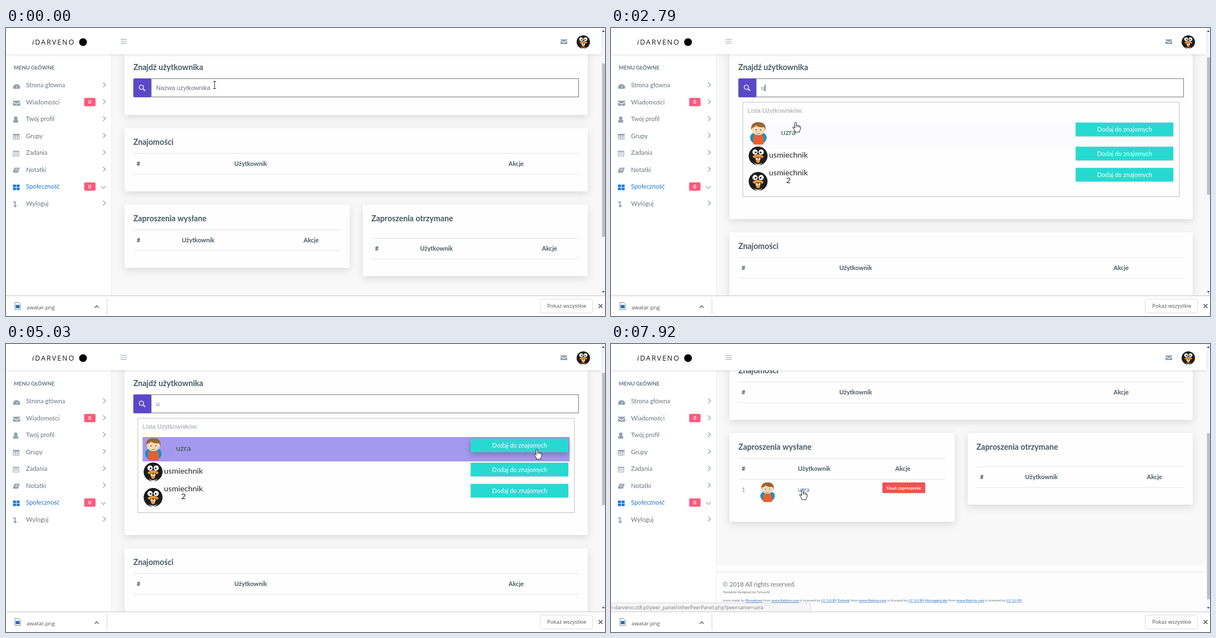
Write an HTML page that moves like this. It is 1077 px wide and 520 px high and loops after 8000 ms.

```html
<!DOCTYPE html>
<html lang="pl">
<head>
<meta charset="utf-8">
<style>
  html, body { margin: 0; width: 100%; height: 100%; overflow: hidden; background: #fff; }
  svg { display: block; }
  text { font: 11.1px Lato, sans-serif; fill: #67757f; white-space: pre; }
  .bold { font-weight: 700; fill: #455a64; }
  .title { font-size: 14.2px; }
  .name { font-size: 14.2px; fill: #222; text-anchor: middle; }
  .white { fill: #fff; text-anchor: middle; }
  .field { font-family: "Liberation Sans", Arial, sans-serif; }
  .shell { font: 9.5px "Open Sans", sans-serif; fill: #4c4f54; }
  .tiny { font-size: 6.3px; }
  .link { fill: #1f6fc0; text-decoration: underline; }
  .card { fill: #fefefe; filter: drop-shadow(0 4px 7px rgba(0,0,0,.12)); }
  .button { filter: drop-shadow(0 1px 1px rgba(0,0,0,.15)); }
  .line { stroke: #e0e3e5; fill: none; }
  .icon { fill: #8fa2ad; }
  .stroke { fill: none; stroke: #8fa2ad; stroke-width: 1.2; }
</style>
</head>
<body>
<svg id="stage" width="1077" height="520" viewBox="0 0 1077 520"></svg>
<script>
const text = (x, y, s, cls = '', extra = '') => `<text x="${x}" y="${y}" class="${cls}" ${extra}>${s}</text>`;
const rect = (x, y, w, h, fill, extra = '') => `<rect x="${x}" y="${y}" width="${w}" height="${h}" fill="${fill}" ${extra}/>`;
const path = (d, extra = '') => `<path d="${d}" ${extra}/>`;
const group = (id, body) => `<g id="${id}">${body}</g>`;
const place = (x, y, scale, body) => `<g transform="translate(${x} ${y}) scale(${scale})">${body}</g>`;
const card = (x, y, w, h, id = '') => rect(x, y, w, h, '', `rx="3" class="card" id="${id}"`);
const link = s => `<tspan class="link">${s}</tspan>`;

const penguin = (x, y, r) => place(x, y, r / 17, `
  <circle r="17" fill="#1d1d1f"/>
  <circle cx="-5.5" cy="-7" r="4.7" fill="#fff"/><circle cx="5.5" cy="-7" r="4.7" fill="#fff"/>
  <circle cx="-4.5" cy="-6.5" r="1.6"/><circle cx="4.5" cy="-6.5" r="1.6"/>
  <path d="M-10 1Q0-7 10 1Q8 5 4 4L3 11Q0 14-3 11L-5 4Q-9 4-10 1" fill="#f09a32"/>
  <path d="M-5 2H6L5 5H-4Z" fill="#5a2a18"/>
  <path d="M-4 3h3v4h-3zM1 3h3v4h-3z" fill="#fff"/>
  <path d="M-8 12Q0 18 8 12Q4 17 0 17T-8 12" fill="#eee"/>`);

const boy = (x, y, scale) => place(x, y, scale, `
  <path d="M-15 8Q-14-1-5-1H5Q14-1 15 8Q13 20 0 20T-15 8" fill="#1d8fc1"/>
  <path d="M-9 20Q-11 7-6 2L0 6L6 2Q11 7 9 20Q0 21-9 20" fill="#ec5f2c"/>
  <ellipse cy="-7" rx="12" ry="10.5" fill="#fad5ae"/>
  <path d="M-13-6Q-14-19-2-20Q14-21 13-6L10-11Q0-10-4-14Q-8-10-11-10Z" fill="#97652f"/>
  <circle cx="-5" cy="-6" r="2.2" fill="#fff"/><circle cx="5" cy="-6" r="2.2" fill="#fff"/>
  <circle cx="-4.5" cy="-6" r="1.2" fill="#333"/><circle cx="4.5" cy="-6" r="1.2" fill="#333"/>
  <path d="M-3 0Q0 2 3 0" stroke="#b5654a" fill="none"/>`);

const envelope = (x, y) => place(x, y, 1, path('M0 1H12V2.5L6 6L0 2.5ZM0 4L6 7.5L12 4V9.5H0Z', 'class="icon"'));

const addButton = (x, y, id = '') =>
  rect(x, y, 175.5, 24.7, '#26dad2', `class="button" id="${id}"`) + text(x + 88, y + 16.3, 'Dodaj do znajomych', 'white');

// Table header: columns are the x positions of its three labels.
const tableHead = (x1, x2, y, cols) =>
  path(`M${x1} ${y}H${x2}M${x1} ${y + 37.5}H${x2}`, 'class="line"') +
  ['#', 'Użytkownik', 'Akcje'].map((s, i) => text(cols[i], y + 22.7, s, 'bold')).join('');

const person = ['uzra', 'usmiechnik', '2'];

const listPlain = group('listPlain',
  text(286, 183.5, person[0], 'name') + text(286, 204, person[1], 'name') +
  text(286, 224.5, person[1], 'name') + text(286, 239.8, person[2], 'name') +
  addButton(835.5, 170.8) + addButton(660, 191.3) + addButton(484, 211.8));

const listRich = group('listRich',
  rect(245.5, 168, 768, 44, '#a598ef', 'id="row1"') + rect(245.5, 212, 768, 38, '#a598ef', 'id="row2"') +
  boy(265, 190, 1) + penguin(264.5, 231, 17) + penguin(264.5, 277, 17) +
  text(319, 193, person[0], 'name', 'id="name1"') + text(319, 233.7, person[1], 'name') +
  text(319, 265.5, person[1], 'name') + text(319, 280, person[2], 'name') +
  addButton(835.5, 170.8, 'add1') + addButton(835.5, 214.3) + addButton(835.5, 252.5));

const search =
  card(213, 20, 833, 137, 'searchCard') + text(229, 76, 'Znajdź użytkownika', 'bold title') +
  rect(261, 91.5, 768.5, 33, '#fff', 'stroke="#777"') + rect(229, 91, 32, 34, '#5a48c8', 'rx="2" class="button"') +
  path('M247 110.5l3 3', 'stroke="#fff" stroke-width="1.8"') +
  '<circle cx="243.5" cy="107" r="3.9" fill="none" stroke="#fff" stroke-width="1.4"/>' +
  text(270, 112, 'Nazwa użytkownika', 'field', 'id="hint"') + text(270, 112, 'u', 'field', 'id="typed"') +
  rect(270, 102, 1, 12.5, '#222', 'id="caret"') +
  group('list', rect(237, 134, 785, 120, '#fefefe', 'stroke="#bcbfc1" id="listBox"') +
    text(245.5, 153, 'Lista Użytkowników:', 'field', 'style="fill:#99a3a6"') + listPlain + listRich);

const sentRow = group('sentRow', tableHead(229, 601, 364.5, [235, 336, 511]) +
  text(235, 425, '1', '', 'style="fill:#8f8ba8"') + boy(281.5, 425.5, .88) +
  text(336, 425, person[0], '', 'style="fill:#4a6cb8"') +
  rect(488, 408, 77, 19, '#ef5350', 'rx="2" class="button"') +
  text(526.5, 420.5, 'Usuń zaproszenie', 'white bold', 'style="font-size:8px;fill:#fff"'));

const source = link('www.flaticon.com') + ' is licensed by ' + link('CC 3.0 BY');
const credits = ['Brevaikons', 'Dolnuik', 'MorvagenLabs'].map(s => `${link(s)} from ${source}`).join(' ');
const footer = group('footer', rect(189, 558, 882, 120, '#fdfdfd') + path('M189 569.5H1071', 'class="line"') +
  text(201, 595.5, '© 2018 All rights reserved.') + text(201, 608, 'Template designed by Tynvarib', 'tiny') +
  text(201, 623, 'Icons made by ' + credits, 'tiny'));

const below = group('below',
  card(213, 181, 833, 114) + text(229, 211, 'Znajomości', 'bold title') + tableHead(229, 1030, 226.5, [235, 410.5, 903.5]) +
  card(213, 319, 405, 114, 'sentCard') + text(229, 349, 'Zaproszenia wysłane', 'bold title') +
  group('sentEmpty', tableHead(229, 601, 364.5, [235, 316, 535])) + sentRow +
  card(641.5, 319, 404.5, 129) + text(657, 349, 'Zaproszenia otrzymane', 'bold title') +
  tableHead(657, 1030, 379.5, [663.5, 744.5, 963.5]) + footer);

const menu = [
  ['Strona główna', 'M0 9A6.5 6.5 0 0 1 13 9L12 11H1ZM6 9L8 4L7.5 9Z'],
  ['Wiadomości', 'M0 2H13V3.5L6.5 7.5L0 3.5ZM0 5L6.5 9L13 5V11H0Z'],
  ['Twój profil', 'M5 0A3 3 0 0 1 5 6.5A3 3 0 0 1 5 0M.5 11Q0 6 3 6Q5 7.5 7 6Q10 6 9.5 11Z'],
  ['Grupy', 'M0 1H12V11H0ZM1 4V6H4V4ZM5 4V6H8V4ZM9 4V6H11.5V4ZM1 7V10H4V7ZM5 7V10H8V7ZM9 7V10H11.5V7Z'],
  ['Zadania', 'M0 1H11V11H0ZM1 3V10H10V3ZM2 4.5H9V5.5H2ZM2 7H9V8H2Z'],
  ['Notatki', 'M3 1H12L9 10H1Q0 10 0 8ZM4.5 3L4 4H9L9.5 3ZM4 5.5L3.5 6.5H8L8.5 5.5Z'],
  ['Społeczność', 'M0 1H5.5V5.5H0ZM6.5 1H12V5.5H6.5ZM0 6.5H5.5V11H0ZM6.5 6.5H12V11H6.5Z'],
  ['Wyloguj', 'M0 1H5V8H7.5L4 12L.5 8H3V3H1Z']
].map(([label, icon], i) => {
  const y = 107.3 + 30.5 * i, active = i == 6, color = active ? '#1976d2' : '#8fa2ad';
  const badge = i == 1 || active
    ? rect(140.5, y + 19 - 30.5, 20.5, 15, '#fb5b7c', 'rx="2"') +
      text(150.7, y - .5, '0', 'white bold', 'style="fill:#fff;font-size:9px"') : '';
  const chevron = active ? `M171 ${y - 5}l4.2 4.5l4.2-4.5` : `M174.5 ${y - 9}l4.5 4.2l-4.5 4.2`;
  return place(12.5, y - 8.5, 1, path(icon, `fill="${color}" fill-rule="evenodd"`)) +
    text(36, y, label, '', active ? 'style="fill:#1976d2"' : '') + badge + path(chevron, 'class="stroke"');
}).join('');

const sidebar = rect(0, 48, 189, 436, '#fff') + path('M189.5 48V484', 'stroke="#eee"') +
  text(14, 74.5, 'MENU GŁÓWNE', 'bold', 'style="font-size:9.5px;fill:#607585"') + menu;

const scrollbar = rect(1070.5, 0, 7, 484, '#f8f8f8') + rect(1071.5, 64, 6, 313, '#c1c1c1', 'id="thumb"') +
  path('M1071.5 7l2.5-3l2.5 3zM1071.5 475l2.5 3l2.5-3z', 'fill="#444"');

const header = rect(0, 0, 1070.5, 47.5, '#fff', 'style="filter:drop-shadow(0 1px 2px rgba(0,0,0,.13))"') +
  text(47, 30, '<tspan font-style="italic">i</tspan>DARVENO', '', 'style="font:12.5px Open Sans,sans-serif;letter-spacing:2px;fill:#111"') +
  '<circle cx="138.5" cy="25.5" r="7"/>' +
  path('M206 20.5h11M206 24h11M206 27.5h11', 'class="stroke"') + envelope(997, 19.5) + penguin(1038, 25.3, 12);

const address = `i-darveno.ct8.pl/peer_panel/otherPeerPanel.php?peername=${person[0]}`;
const browser =
  group('status', rect(-1, 467.5, 359.5, 17, '#f6f6f6', 'stroke="#d6d6d6"') +
    text(1, 478.5, address, 'shell', 'style="font-size:9px;fill:#777"')) +
  rect(0, 483, 1077, 37, '#fff') + path('M0 483.5H1077', 'stroke="#c6c6c6"') + path('M181.5 488V517', 'stroke="#d5d5d5"') +
  path('M16 495.5H23L26 498.5V508.5H16Z', 'fill="#fff" stroke="#7a8ba0"') + rect(17.5, 500, 7, 6, '#2a6fb8') +
  text(37, 508, 'awatar.png', 'shell', 'style="font-size:9.7px"') +
  path('M159.5 505l3.5-3.5l3.5 3.5', 'fill="none" stroke="#555" stroke-width="1.3"') +
  rect(960.5, 489.5, 94, 25, '#fff', 'rx="3" stroke="#dadce0"') + text(973, 505.3, 'Pokaż wszystkie', 'shell') +
  path('M1065.5 498.5l7 7m0-7l-7 7', 'stroke="#555" stroke-width="1.5"');

const pointers =
  group('beam', path('M-2.5-6.5H2.5M0-6.5V6.5M-2.5 6.5H2.5', 'stroke="#222"')) +
  group('arrow', path('M0 0V13L3 10.2L5 14.5L7 13.6L5.1 9.5H9Z', 'fill="#fff" stroke="#222"')) +
  group('hand', path('M-1.5 1Q0-1 1.5 1V6Q3 5 4 6.5Q5.5 5.5 6.5 7Q8.5 6.5 8.7 8.5V12Q8.5 14 7 15.5V18H-1V16Q-3 13-5 10Q-5 8-3 9L-1.5 11Z', 'fill="#fff" stroke="#222"') +
    path('M1.5 6V9M4 6.5V9.5M6.5 7V10', 'stroke="#222" stroke-width=".8"'));

document.getElementById('stage').innerHTML = rect(0, 0, 1077, 520, '#f8f8f8') +
  group('page', search + below) + sidebar + scrollbar + header + browser + group('pointer', pointers);

const el = id => document.getElementById(id);
const show = (id, on) => el(id).style.display = on ? '' : 'none';
const move = (id, x, y) => el(id).setAttribute('transform', `translate(${x} ${y})`);

// Linear interpolation through [time, value, value...] points.
function track(keys, t) {
  let i = 1;
  while (i < keys.length - 1 && t > keys[i][0]) i++;
  const a = keys[i - 1], b = keys[i];
  const k = Math.min(1, Math.max(0, (t - a[0]) / (b[0] - a[0])));
  return a.slice(1).map((v, j) => v + (b[j + 1] - v) * k);
}

const pointerKeys = [[0, 375, 103], [1180, 375, 103], [1260, 374, 103], [1790, 373.5, 103], [2480, 364, 130],
  [2760, 332, 170], [2850, 332, 170], [3340, 640, 190], [3700, 870, 232], [3900, 945, 235], [4090, 955, 192],
  [4170, 955, 190], [5030, 955, 190], [5450, 765, 158], [5820, 654, 121], [6310, 654, 121], [6750, 612, 198],
  [6910, 611, 200], [7070, 560, 220], [7310, 350, 268], [7540, 349, 267], [7690, 344, 263]];
const row1Keys = [[2700, 0], [2790, .03], [3250, 1], [3550, 1], [3800, .55], [4090, 1], [5200, 1], [5700, 0]];
const row2Keys = [[3550, 0], [3800, .45], [4090, 0]];
const scrollKeys = [[6760, 0], [6910, 45], [7070, 118], [7310, 158]];

function draw(t) {
  const typed = t >= 1650 && t < 5890, open = t >= 1710 && t < 6120, rich = t >= 1870, sent = t >= 4350;
  const grow = open ? (rich ? 188 : 137) : 0;
  const [scroll] = track(scrollKeys, t), [x, y] = track(pointerKeys, t);
  const [hover] = track(row1Keys, t);

  move('page', 0, -scroll);
  move('below', 0, grow);
  el('searchCard').setAttribute('height', 137 + grow);
  el('listBox').setAttribute('height', rich ? 170.5 : 119.5);
  show('list', open);
  show('listPlain', !rich);
  show('listRich', rich);
  el('row1').style.opacity = hover;
  el('row2').style.opacity = track(row2Keys, t)[0];
  el('name1').style.fill = hover > 0 ? '#2f5a45' : '';
  el('add1').style.filter = t > 4050 && t < 5100 ? 'drop-shadow(0 4px 5px rgba(0,0,0,.25))' : '';

  show('sentEmpty', !sent);
  show('sentRow', sent);
  show('footer', sent);
  el('sentCard').setAttribute('height', sent ? 160 : 114);

  show('hint', !typed);
  show('typed', typed);
  const blinkStart = t < 1650 ? 70 : t < 5800 ? 1650 : 5800;
  const focused = t < 4250 || t >= 5800;
  show('caret', focused && t >= 70 && (t - blinkStart) % 1100 < 555);
  el('caret').setAttribute('x', typed ? 276.5 : 270);

  const [top, size] = sent ? (open ? [52, 239] : [63, 300]) : open ? (rich ? [53, 248] : [56, 262]) : [64, 313];
  el('thumb').setAttribute('y', top + scroll * .62);
  el('thumb').setAttribute('height', size);

  const kind = t >= 7690 || (open && y >= 168) ? 'hand' : t < 6400 && y < 125 ? 'beam' : 'arrow';
  for (const id of ['beam', 'arrow', 'hand']) show(id, id == kind);
  move('pointer', x, y);
  show('status', t >= 7840);
}

const start = performance.now();
(function tick() {
  draw((performance.now() - start) % 8000);
  requestAnimationFrame(tick);
})();
</script>
</body>
</html>
```
